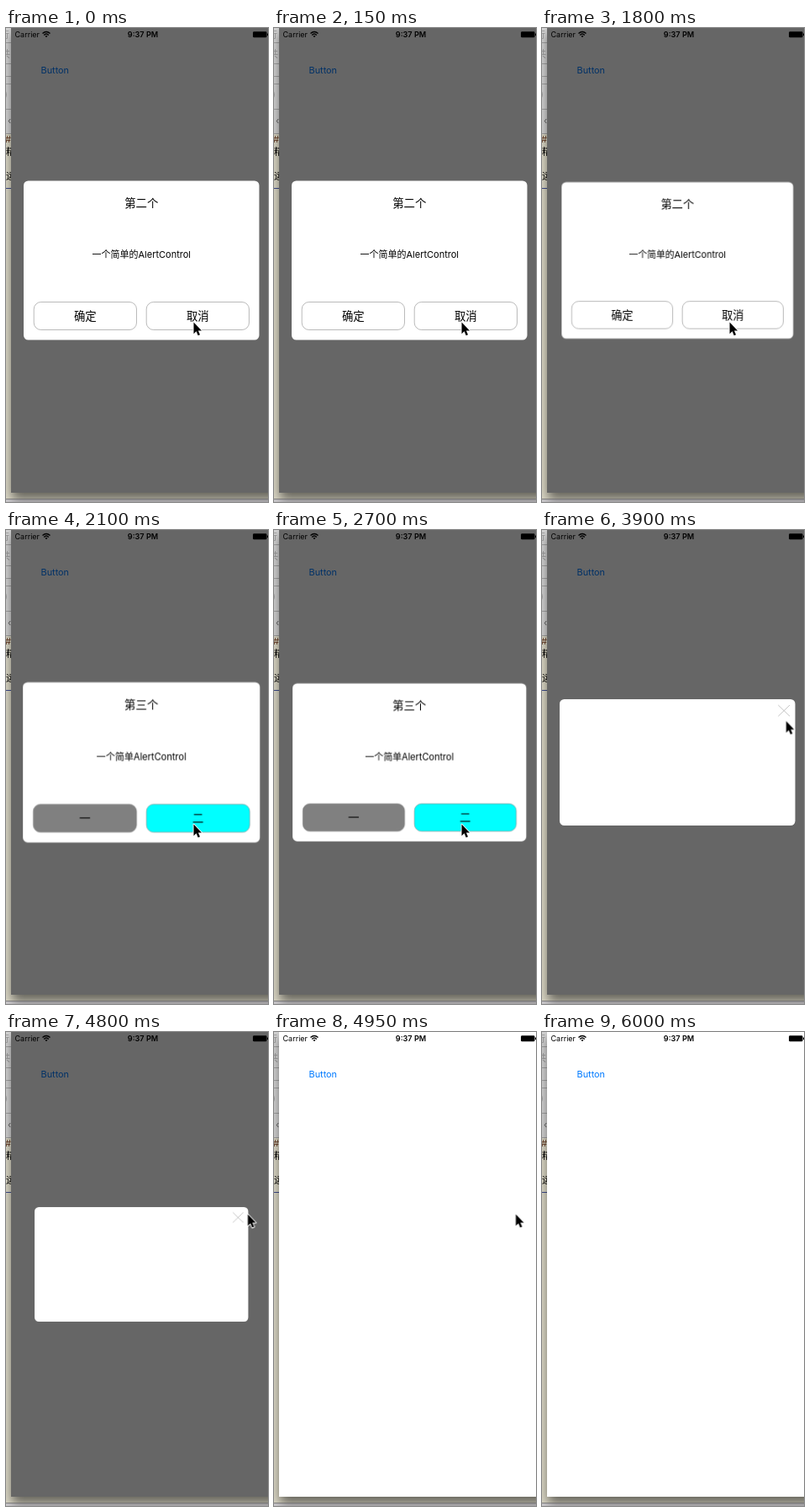
Write an HTML page that moves like this. It is 312 by 563 pixels and loops after 7140 ms.

```html
<!DOCTYPE html>
<html lang="zh-CN">
<head>
<meta charset="utf-8">
<title>Alert dialogs</title>
<style>
  html, body { margin: 0; width: 100%; height: 100%; overflow: hidden; background: #d9d5c4; }
  svg { display: block; position: absolute; left: 0; top: 0; }
  text { font-family: Inter, "Noto Sans CJK SC", "Noto Sans CJK", sans-serif; }
  .mid { text-anchor: middle; }
  .title { font-size: 13.4px; }
  .body { font-size: 11px; }
  .dialog { transform-origin: 161.25px 276px; }
  .shadow { filter: blur(7px); }
  .hair { fill: none; stroke: #b4b4b4; stroke-width: .8; }
</style>
</head>
<body>
<svg id="stage" width="312" height="563" viewBox="0 0 312 563">
  <g id="desk">
    <rect width="312" height="563" fill="#dedac8"/>
    <rect width="12" height="125" fill="#d6d6d6"/>
    <g font-size="11" fill="#9a9a9a">
      <text x="-7" y="12">行</text>
      <text x="-6" y="35">共</text>
      <text x="-2" y="82">)</text>
      <text x="2" y="114" fill="#666">‹</text>
    </g>
    <path d="M0 17.5H8M0 42.5H8M0 57.5H8M0 66.5H8M0 96.5H8M0 125.5H8" stroke="#a3a3a3"/>
    <g font-size="11">
      <text x="-1" y="136" fill="#643820">#</text>
      <text x="0" y="151">精</text>
      <text x="0" y="180">运</text>
    </g>
    <path d="M0 190.5H8" stroke="#3c4a8c"/>
    <rect y="559" width="312" height="4" fill="#cfcdd0"/>
  </g>
  <rect class="shadow" x="7" y="6" width="330" height="554" fill="#000" opacity=".55"/>
  <path d="M0 559.5H312" stroke="#6e6c6c" stroke-width=".8"/>

  <g id="phone">
    <rect x="6" y="0" width="306" height="552" fill="#fff"/>
    <text x="10.5" y="11.3" font-size="9">Carrier</text>
    <g fill="none" stroke="#000" stroke-width="1.4">
      <path d="M43.5 6.6Q48 2.4 52.5 6.6M45.2 8.4Q48 5.8 50.8 8.4"/>
    </g>
    <path d="M46.5 9.6Q48 8.3 49.5 9.6L48 11.2Z"/>
    <text class="mid" x="163" y="11.3" font-size="9.1" font-weight="600">9:37 PM</text>
    <rect x="294" y="4.3" width="16.5" height="7" rx="1.4"/>
    <rect x="311" y="6.5" width="1" height="2.6"/>
    <text x="41.5" y="54.2" font-size="10.9" fill="#007aff">Button</text>
  </g>

  <rect id="dim" x="6" y="0" width="306" height="552" fill="#000" fill-opacity=".6"/>
  <g id="dialogs"></g>
  <g id="cursor">
    <path d="M1.5 1.6V15.2L4.6 12.3L6.7 17.3L9 16.3L6.9 11.5H11Z" fill="#000"
      stroke="#fff" stroke-width="1.8" stroke-linejoin="round" paint-order="stroke"/>
  </g>
</svg>
<script>
const LOOP = 7140;
const $ = id => document.getElementById(id);

const panel = (y, h) =>
  `<rect x="21" y="${y}" width="280.5" height="${h}" rx="5.5" fill="#fff"/>`;

const label = (kind, x, y, s) => `<text class="mid ${kind}" x="${x}" y="${y}">${s}</text>`;

const button = (x, s, fill) =>
  `<rect x="${x}" y="325.5" width="122.3" height="33" rx="8.5" fill="${fill}" stroke="#8c8c8c" stroke-width=".6"/>` +
  label('title', x + 61.1, 347, s);

const choice = (title, body, left, right) =>
  panel(181.5, 189) + label('title', 161.25, 212.6, title) + label('body', 161.25, 273, body) +
  button(33.2, ...left) + button(167.2, ...right);

const dialogs = [
  choice('第二个', '一个简单的AlertControl', ['确定', '#fff'], ['取消', '#fff']),
  choice('第三个', '一个简单AlertControl', ['一', '#808080'], ['二', '#0ff']),
  panel(201, 150) + '<path class="hair" d="M281.3 208L295 221.2M295 208L281.3 221.2"/>'
];
$('dialogs').innerHTML = dialogs.map(d => `<g class="dialog">${d}</g>`).join('');

// Plays rows of [ms, value], each held until the next row.
function play(el, rows, style) {
  const frames = rows.map(([t, ...v]) => ({ offset: t / LOOP, easing: 'step-end', ...style(...v) }));
  frames.push({ ...frames[frames.length - 1], offset: 1 });
  el.animate(frames, { duration: LOOP, iterations: Infinity });
}

const zoom = s => ({ opacity: s ? 1 : 0, transform: `scale(${s || 1})` });
const place = (x, y) => x === undefined
  ? { opacity: 0, transform: 'translate(0px, 0px)' }
  : { opacity: 1, transform: `translate(${x}px, ${y}px)` };

const scales = [
  [[0, 1], [1800, .983], [1950, .9], [2100, 0]],
  [[0, 0], [2100, 1.006], [2250, 1], [2700, .992], [2850, .9], [3000, 0]],
  [[0, 0], [3000, 1], [4800, .907], [4950, 0]]
];
document.querySelectorAll('.dialog').forEach((el, i) => play(el, scales[i], zoom));

play($('dim'), [[0, 1], [4950, 0]], opacity => ({ opacity }));

play($('cursor'), [
  [0, 222, 348], [3450, 231.5, 323.5], [3600, 263.5, 267.5], [3750, 267.5, 261],
  [3900, 289.3, 225.5], [4050, 289, 225], [4200, 288, 221], [4350, 286.5, 215],
  [5250, 267, 313.5], [5400, 246, 445.5], [5550, 245, 474.5], [5700, 255.5, 502.5],
  [5850, 269.5, 535.5], [6000]
], place);
</script>
</body>
</html>
```
